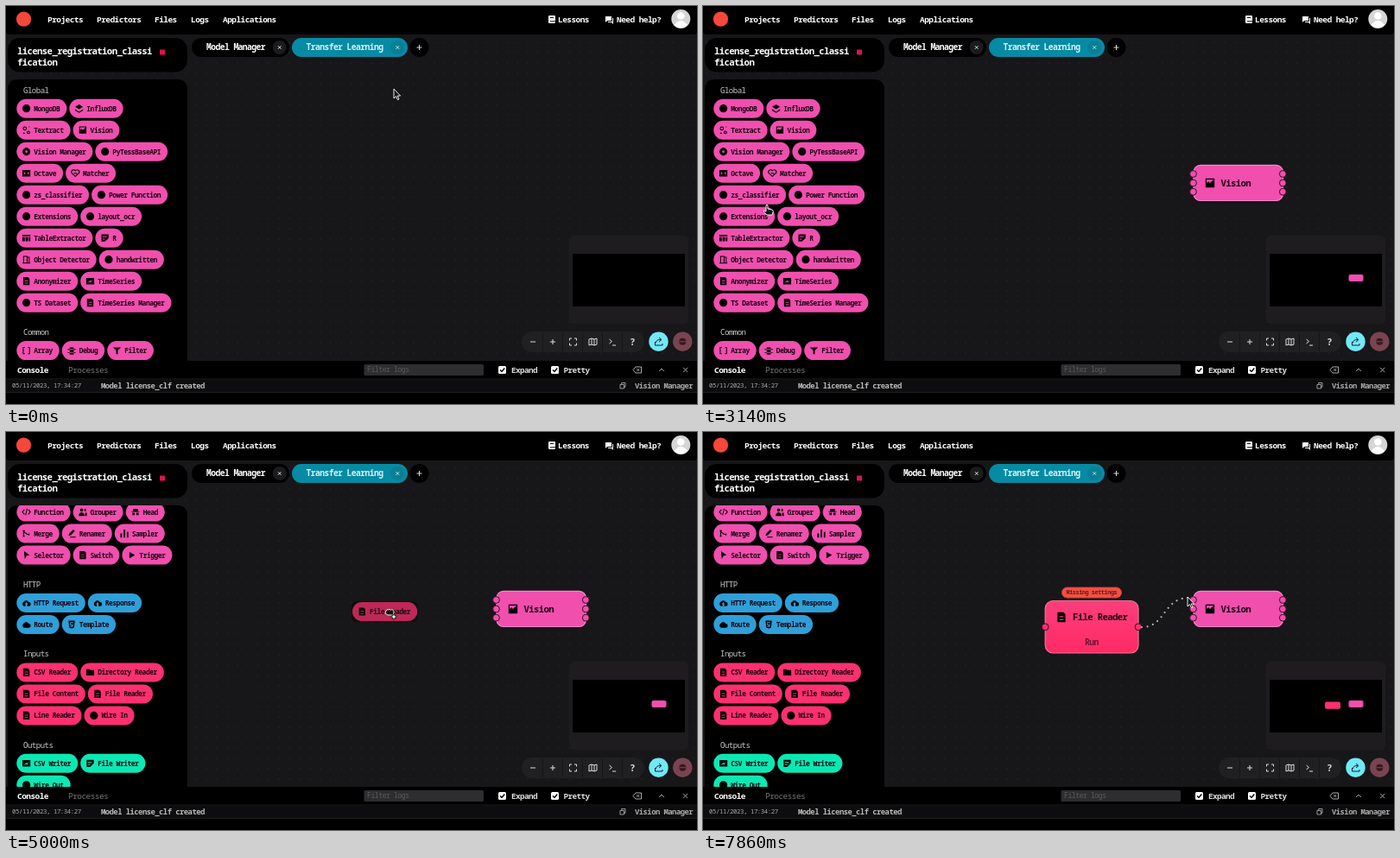
An HTML page that plays this animation: 800 px wide and 461 px high, repeating every 8000 ms.

```html
<!DOCTYPE html>
<html lang="en">
<head>
<meta charset="utf-8">
<title>Flow editor</title>
<style>
html, body { margin: 0; width: 100%; height: 100%; overflow: hidden; background: #000; }
svg { display: block; width: 100%; height: 100%; }
text { font-family: "Noto Sans Mono", "DejaVu Sans Mono", monospace; font-weight: 700; letter-spacing: -.06em; white-space: pre; }
.line { fill: none; stroke: #000; stroke-width: 1.1; }
.solid { fill-rule: evenodd; }
.thin { fill: none; stroke: #ddd; stroke-width: 1; }
.cursor path { fill: #151515; stroke: #fff; stroke-width: .9; stroke-linejoin: round; }
</style>
</head>
<body>
<svg id="stage" viewBox="0 0 800 461"></svg>
<script>
const LOOP = 8000, STEPS = 56;
const PINK = '#f04fae', BLUE = '#2f9fd9', RED = '#fd3070', GREEN = '#0ce8b4';
const CHAR = 4.29;

// Icons sit in a 10 by 10 box around the origin; a leading * means filled.
const ICONS = {
  dot: '*M-5 0a5 5 0 1 0 10 0a5 5 0 1 0-10 0',
  layers: '*M0-5L5-2 0 1-5-2ZM-5 1L0 4 5 1V2.5L0 5.5-5 2.5Z',
  nodes: 'M-4-2a2 2 0 1 0 4 0a2 2 0 1 0-4 0M1 3a1.5 1.5 0 1 0 3 0a1.5 1.5 0 1 0-3 0M-4 4h2M3-4h1',
  image: '*M-4.5-4.5H4.5V4.5H-4.5ZM-3.5-3.5H3.5L0 0-1.5-1.5-3.5 0Z',
  gear: '*M-1-5H1L4-3 5 0 4 3 1 5H-1L-4 3-5 0-4-3ZM-1.5 0a1.5 1.5 0 1 0 3 0a1.5 1.5 0 1 0-3 0',
  box: '*M-5-4H5V4H-5ZM-3.5 0L-1.5-2V2ZM3.5 0L1.5-2V2Z',
  heart: 'M0 4L-4.5 0A2.5 2.5 0 0 1 0-3A2.5 2.5 0 0 1 4.5 0ZM-2 0H1L3 2',
  table: '*M-5-4H5V-2H-5ZM-5-1H-2V4H-5ZM-1-1H2V4H-1ZM3-1H5V4H3Z',
  edit: '*M-4.5-4.5H4.5V0L0 4.5H-4.5ZM-3-2H2V-1H-3ZM-3 1H0V2H-3Z',
  door: 'M-5 4.5H5M-3.5 4.5V-4H1V4.5M1-3H3.5V4.5M-.8 0V1',
  doc: '*M-4-5H2L4-3V5H-4ZM-2-1H2V0H-2ZM-2 2H2V3H-2Z',
  chart: '*M-5-4H5V4H-5ZM-3.5 2L0-1 1 0 3-2 1 2 0 1Z',
  brackets: 'M-2-4H-4V4H-2M2-4H4V4H2',
  bug: '*M-2.5-4H2.5V5H-2.5ZM-5-2H5V-1H-5ZM-5 2H5V3H-5Z',
  funnel: '*M-5-4H5L1 0V5L-1 4V0Z',
  code: 'M-2.5-3L-5 0-2.5 3M2.5-3L5 0 2.5 3M1-4L-1 4',
  people: '*M-3.5-2.5a2 2 0 1 0 4 0a2 2 0 1 0-4 0M-5 5V3Q-1.5-2 2 3V5ZM2-4H4V-1H2ZM3 1H5V5H3Z',
  spy: '*M-5-1H5V0H-5ZM-3-4H3V-1H-3ZM-4 1H-1V4H-4ZM1 1H4V4H1Z',
  branch: 'M-3.5-4V4M-4.5-3.5H-2M-4.5 3.5H-2M-3-2L1 1H4M3 0V2.5',
  pen: '*M-4 3L-3 0 2-5 4-3-1 2ZM-2 4H5V5H-2Z',
  bars: '*M-5 0H-3V5H-5ZM-1-5H1V5H-1ZM3-2H5V5H3Z',
  arrow: '*M-3-5L4 0 0 1-2 5Z',
  play: '*M-3-4L4 0-3 4Z',
  cloud: '*M-3 4A3 3 0 0 1-3-1.5 3.5 3.5 0 0 1 3-1 2.5 2.5 0 0 1 3 4Z',
  upload: '*M-3 4A3 3 0 0 1-3-1.5 3.5 3.5 0 0 1 3-1 2.5 2.5 0 0 1 3 4ZM0-1L2 1.5H1V4H-1V1.5H-2Z',
  shield: '*M-4-5H4L3 4 0 5-3 4ZM-2-3H2V-2H-1V0H2L1 3H-2V2H0V1H-2Z',
  folder: '*M-5-4H-1L0-3H5V4H-5Z'
};

const SECTIONS = [
  ['Global', PINK, [
    'dot MongoDB|layers InfluxDB', 'nodes Textract|image Vision',
    'gear Vision Manager|dot PyTessBaseAPI', 'box Octave|heart Matcher',
    'dot zs_classifier|dot Power Function', 'dot Extensions|dot layout_ocr',
    'table TableExtractor|edit R', 'door Object Detector|dot handwritten',
    'doc Anonymizer|chart TimeSeries', 'dot TS Dataset|doc TimeSeries Manager']],
  ['Common', PINK, [
    'brackets Array|bug Debug|funnel Filter', 'code Function|people Grouper|spy Head',
    'branch Merge|pen Renamer|bars Sampler', 'arrow Selector|doc Switch|play Trigger']],
  ['HTTP', BLUE, ['upload HTTP Request|upload Response', 'cloud Route|shield Template']],
  ['Inputs', RED, [
    'doc CSV Reader|folder Directory Reader', 'doc File Content|doc File Reader',
    'doc Line Reader|dot Wire In']],
  ['Outputs', GREEN, ['chart CSV Writer|edit File Writer', 'dot Wire Out']]
];

const text = (x, y, size, str, fill = '#fff', extra = '') =>
  `<text x="${x}" y="${y}" font-size="${size}" fill="${fill}" ${extra}>${str}</text>`;
const rect = (x, y, w, h, r, fill, extra = '') =>
  `<rect x="${x}" y="${y}" width="${w}" height="${h}" rx="${r}" fill="${fill}" ${extra}/>`;
const circle = (x, y, r, fill, extra = '') =>
  `<circle cx="${x}" cy="${y}" r="${r}" fill="${fill}" ${extra}/>`;
const path = (d, cls = 'thin', extra = '') => `<path class="${cls}" d="${d}" ${extra}/>`;
const group = (id, body, extra = '') => `<g id="${id}" ${extra}>${body}</g>`;

function icon(name, x, y, scale = 1) {
  const d = ICONS[name], solid = d[0] === '*';
  return path(solid ? d.slice(1) : d, solid ? 'solid' : 'line',
    `transform="translate(${x} ${y}) scale(${scale})"`);
}

const pillWidth = label => 28 + label.length * CHAR;
function pill(x, y, kind, label, color) {
  return rect(x, y, pillWidth(label), 22, 11, color) + icon(kind, x + 11.3, y + 11, .92) +
    text(x + 20, y + 13.9, 7.95, label, '#1a0712');
}

function sidebar() {
  let out = '', head = 97;
  for (const [title, color, rows] of SECTIONS) {
    out += text(20, head + 3.6, 9.1, title, '#c9c9c9', 'style="font-weight:500"');
    rows.forEach((row, i) => {
      let x = 12.3;
      for (const item of row.split('|')) {
        const gap = item.indexOf(' '), label = item.slice(gap + 1);
        out += pill(x, head + 10.7 + i * 25, item.slice(0, gap), label, color);
        x += pillWidth(label) + 3;
      }
    });
    head += 21.7 + (rows.length - 1) * 25 + 33.7;
  }
  return out;
}

const cross = (x, y, r, color) =>
  path(`M${x - r} ${y - r}l${2 * r} ${2 * r}m0 ${-2 * r}l${-2 * r} ${2 * r}`, 'thin', `style="stroke:${color}"`);
const port = (x, y, fill) => circle(x, y, 3.9, fill, 'stroke="#33101f" stroke-width="1"');
const checkbox = x => rect(x, 417, 9, 9, 1.5, '#fff') +
  path(`M${x + 2} 421.5l2 2 3.3-4`, 'thin', 'style="stroke:#000;stroke-width:1.4"');

const header = () => path('M0 0H800V29Q800 33 796 33H4Q0 33 0 29Z', '') +
  circle(20.5, 15.2, 8.6, '#f5473a') +
  [[48, 'Projects'], [105, 'Predictors'], [172, 'Files'], [214, 'Logs'], [251, 'Applications'],
    [639, 'Lessons'], [707, 'Need help?']].map(([x, s]) => text(x, 18.8, 9.5, s)).join('') +
  rect(628, 11, 8, 9, 1.3, '#fff') + path('M630 13.5H634M630 17.8H636', 'thin', 'style="stroke:#000"') +
  path('M694 12H701V17H696L694 19ZM702 14H703V21L701 19H697V18H702Z', '', 'fill="#fff"') +
  circle(781.3, 15, 11, '#d5d5d5') + circle(781.3, 11.5, 4.3, '#fff') +
  path('M773.5 22Q781.3 12 789 22Q781.3 29 773.5 22Z', '', 'fill="#fff"');

const tabs = () => rect(215, 37, 113, 22, 11, '#000') + text(232, 51.2, 9.7, 'Model Manager') +
  circle(316.7, 48, 8, '#1b1a1d') + cross(316.7, 48, 1.8, '#ddd') +
  rect(331, 37, 134, 22, 11, '#078aa3') + text(347.5, 51.2, 9.7, 'Transfer Learning', '#d2f3f8') +
  circle(453.3, 48, 8, '#0a7f96') + cross(453.3, 48, 1.8, '#bde8ef') +
  circle(478.5, 48, 11, '#000') + path('M475.5 48H481.5M478.5 45V51');

const toolbar = () => rect(597, 377, 142, 24, 12, '#201f22') +
  path('M621.5 378V400M644.5 378V400M667.5 378V400M690.5 378V400M713.5 378V400', 'thin', 'style="stroke:#161518"') +
  path('M607 389H613M630 389H636M633 386V392') +
  path('M652.5 387.5V385H655M658 385H660.5V387.5M660.5 390.5V393H658M655 393H652.5V390.5') +
  path('M675 386L678 385 681 386 684 385V392L681 393 678 392 675 393ZM678 385V392M681 386V393') +
  path('M698.5 386L701.5 388.5 698.5 391M702 393H706') +
  text(722.2, 392.8, 10.5, '?', '#ddd') +
  circle(755.5, 388.7, 11.2, '#72e8f6') +
  path('M751.5 389V393H760V391M752.5 390Q753 386 758 386.5M756 384L759 386.5 756 389', 'thin', 'style="stroke:#123"') +
  circle(783.3, 388.7, 11.2, '#794451') + circle(783.3, 388.7, 4, '#3a1720') +
  path('M779.5 388.7H787', 'thin', 'style="stroke:#794451"');

const consoleBar = () => rect(0, 411, 800, 50, 0, '#000') + rect(0, 432.5, 800, 14.5, 0, '#0d0c0e') +
  path('M0 432H800M0 447.5H800', 'thin', 'style="stroke:#1d1c1f"') +
  text(13, 425, 9.5, 'Console') + text(72, 425, 9.5, 'Processes', '#777', 'style="font-weight:500"') +
  rect(414.5, 415, 138.5, 13, 1.5, '#2e2d30') + text(418, 424.4, 8.2, 'Filter logs', '#5b5a5d', 'style="font-weight:500"') +
  checkbox(570) + text(585, 425, 9.3, 'Expand', '#ddd') +
  checkbox(631) + text(645.5, 425, 9.3, 'Pretty', '#ddd') +
  path('M726 421.5L729 418H735.5V425H729Z', 'thin', 'style="stroke:#aaa"') + cross(731.8, 421.5, 1.5, '#aaa') +
  path('M756 423L759 420 762 423', 'thin', 'style="stroke:#999"') + cross(786.7, 421.5, 2.7, '#aaa') +
  text(7, 442.2, 7.4, '05/11/2023, 17:34:27', '#aaa', 'style="font-weight:500"') +
  text(110, 442.7, 8.9, 'Model license_clf created', '#bbb') +
  path('M711 438.5H715.5V443H711ZM712.7 438V436.5H717V441.3H716', 'thin', 'style="stroke:#bbb;stroke-width:.8"') +
  text(728, 442.7, 8.9, 'Vision Manager', '#aaa');

const visionNode = () =>
  rect(568, 184.3, 103.5, 41.2, 8, PINK, 'stroke="#f887ca" stroke-width="1.2"') +
  [194.5, 205, 215.2].map(y => port(567.5, y, PINK) + port(671.3, y, PINK)).join('') +
  icon('image', 587, 205, 1.15) + text(599.5, 208.7, 10.65, 'Vision', '#1c0713');

const readerNode = () =>
  rect(396.2, 195.5, 107.8, 60.5, 9, 'url(#readerFill)', 'stroke="#ff7098" stroke-width="1.2"') +
  port(396.2, 225.8, RED) + port(504, 225.8, RED) +
  icon('doc', 415, 214.5, 1.15) + text(428, 218.2, 10.65, 'File Reader', '#1c0713') +
  text(442, 246.5, 9.8, 'Run', '#6f1535') +
  rect(415.5, 180, 69, 12, 6, '#f2503f', 'stroke="#f53350" stroke-width=".8"') +
  text(420.5, 188.3, 6.8, 'Missing settings', '#6b1a1c');

const POINTERS = {
  arrow: path('M0 0V11L2.6 8.6 4.4 12.6 6 12 4.3 8H7.6Z', ''),
  hand: path('M-1 1Q0-1 1 1V5L6 6Q8 7 7 9L6 12H0L-4 8Q-4 6-1 8Z', ''),
  grab: path('M-2 0Q-1-2 .5-1Q2-2.5 3.5-1Q5-2 6-.5Q7.5 0 7 2L6 7H0L-3 3Z', ''),
  copy: path('M-4-1Q-3-3-1.5-2Q0-3.5 1.5-2Q3-3 4-1.5Q5.5-1 5 1L4 4H-2L-5 2Z', '') +
    path('M4 3H6V5H8V7H6V9H4V7H2V5H4Z', '', 'style="fill:#fff;stroke:#111"'),
  cross: path('M-1-6H1V-1H6V1H1V6H-1V1H-6V-1H-1Z', '')
};

const stage = document.getElementById('stage');
stage.innerHTML = `<defs>
  <pattern id="grid" width="12" height="12" patternUnits="userSpaceOnUse"><circle cx="4" cy="6" r=".55" fill="#343237"/></pattern>
  <linearGradient id="readerFill" x2="0" y2="1"><stop stop-color="#fb3f7c"/><stop offset="1" stop-color="#ff2a64"/></linearGradient>
  <clipPath id="list"><rect x="2" y="85" width="208" height="326" rx="12"/></clipPath></defs>` +
  rect(0, 0, 800, 461, 0, '#171619') + rect(0, 0, 800, 461, 0, 'url(#grid)') +
  header() + tabs() +
  rect(2, 37, 208, 39.5, 14, '#000') + text(13, 56.2, 10.7, 'license_registration_classi') +
  text(13, 69.4, 10.7, 'fication') + rect(178, 50.5, 6, 6, .5, '#d9154c') +
  path('M2 411V97Q2 85 14 85H198Q210 85 210 97V411Z', '') +
  `<g clip-path="url(#list)">${group('items', sidebar())}</g>` +
  rect(652, 265.5, 138, 103, 6, '#1e1c1e') + rect(656, 287, 130, 61, 0, '#000') +
  group('vision', visionNode() + rect(747.5, 311, 17, 8, 2, PINK)) +
  group('reader', readerNode() + rect(720, 312.5, 18, 8.3, 2, RED)) +
  group('tip', rect(517, 217, 50, 17, 3, '#222124') + text(525, 228, 8.5, 'output', '#303033')) +
  path('', 'thin', 'id="wire" style="stroke:#b9b9bb;stroke-width:2.2;stroke-linecap:round;stroke-dasharray:0 6.6"') +
  toolbar() + consoleBar() +
  group('ghostVision', rect(-1, -1, 55, 24, 6, '#000', 'opacity=".5"') + pill(0, 0, 'image', 'Vision', PINK), 'opacity=".72"') +
  group('ghostReader', rect(-1, -1, 77, 24, 6, '#000', 'opacity=".5"') + pill(0, 0, 'doc', 'File Reader', RED), 'opacity=".72"') +
  group('cursor', Object.entries(POINTERS).map(([k, v]) => group(k, v)).join(''), 'class="cursor"');

const el = id => document.getElementById(id);
const show = (id, on) => { el(id).style.display = on ? '' : 'none'; };
const move = (id, x, y) => el(id).setAttribute('transform', `translate(${x} ${y})`);

// Eased position along keys of the form [step, ...values].
function track(n, keys) {
  const i = keys.findIndex(k => k[0] > n);
  if (i < 0) return keys[keys.length - 1].slice(1);
  const a = keys[Math.max(0, i - 1)], b = keys[i];
  const p = Math.max(0, (n - a[0]) / (b[0] - a[0])), e = p * p * (3 - 2 * p);
  return a.slice(1).map((v, j) => v + (b[j + 1] - v) * e);
}

const CURSOR = [
  [0, 449, 96], [7, 125, 146], [9, 119, 146], [15, 612, 199], [16, 612, 200],
  [21, 74, 230], [22, 70, 229], [25, 74, 229], [27, 113, 229], [29, 137, 304],
  [30, 137, 304], [35, 444, 208], [37, 444, 208], [44, 504, 225], [48, 504, 225], [55, 561, 191]
];
const SCROLL = [[21, 0], [22, .7], [26, 331.5]];
const POINTER_AT = [
  [0, 'arrow'], [6, 'hand'], [9, 'grab'], [10, 'copy'], [16, 'arrow'], [21, 'hand'],
  [30, 'grab'], [31, 'copy'], [37, 'arrow'], [44, 'cross'], [48, 'arrow']
];

function render(n) {
  const [x, y] = track(n, CURSOR);
  const pointer = POINTER_AT.filter(k => k[0] <= n).pop()[1];
  for (const name in POINTERS) show(name, name === pointer);
  move('cursor', x, y);
  move('items', 0, -track(n, SCROLL)[0]);
  move('ghostVision', x - 42, y - 13.5);
  move('ghostReader', x - 43, y - 11);
  show('ghostVision', n >= 10 && n < 16);
  show('ghostReader', n >= 31 && n < 37);
  show('vision', n >= 16);
  show('reader', n >= 37);
  show('tip', n >= 45 && n < 48);
  show('wire', n > 48);
  const mid = (504 + x) / 2 + 4;
  el('wire').setAttribute('d', `M508 226C${mid} 226 ${mid - 4} ${y} ${x + 3} ${y + 1}`);
}

function tick(now) {
  render(Math.floor(now % LOOP / LOOP * STEPS));
  requestAnimationFrame(tick);
}
render(0);
requestAnimationFrame(tick);
</script>
</body>
</html>
```
